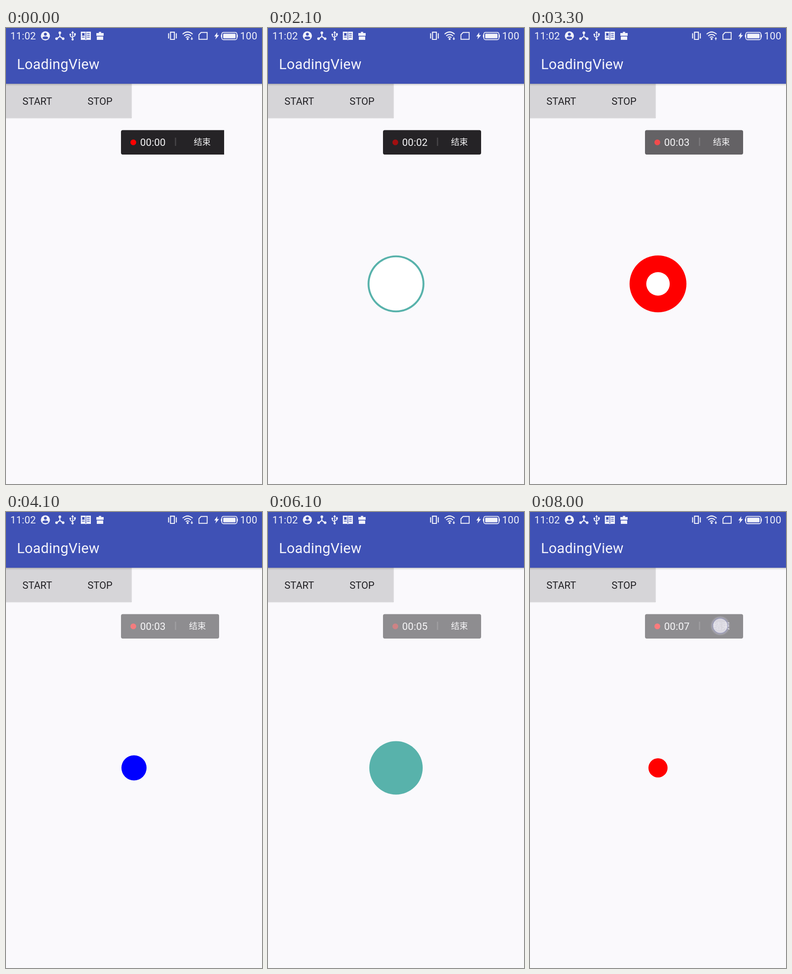
Animation, 561 px wide and 998 px high, one loop 8100 ms. Source, as an HTML page:

```html
<!DOCTYPE html>
<html lang="en">
<head>
<meta charset="utf-8">
<title>LoadingView</title>
<style>
html, body { margin: 0; width: 100%; height: 100%; overflow: hidden; background: #faf9fc; }
svg { display: block; width: 100%; height: 100%; font-family: Roboto, "Noto Sans", sans-serif; }
.cjk { font-family: "Noto Sans CJK SC", "Noto Sans CJK", sans-serif; }
</style>
</head>
<body>
<svg viewBox="0 0 561 998">
  <defs>
    <linearGradient id="shade" x2="0" y2="1">
      <stop offset="0" stop-color="#000" stop-opacity=".34"/>
      <stop offset=".4" stop-color="#000" stop-opacity=".12"/>
      <stop offset="1" stop-color="#000" stop-opacity="0"/>
    </linearGradient>
    <radialGradient id="glow">
      <stop offset=".7" stop-color="#d9d8ee" stop-opacity=".55"/>
      <stop offset="1" stop-color="#d9d8ee" stop-opacity="0"/>
    </radialGradient>
  </defs>
  <rect width="561" height="998" fill="#faf9fc"/>

  <!-- buttons -->
  <rect y="196" width="275" height="3" fill="url(#shade)" opacity=".7"/>
  <rect x="274" y="122" width="2" height="75" fill="#000" opacity=".1"/>
  <rect y="122" width="274.5" height="75" fill="#d6d5d8"/>
  <rect id="pressA" y="122" width="137.5" height="75"/>
  <rect id="pressB" x="137.5" y="122" width="137" height="75"/>
  <g font-size="21.8" fill="#212024" text-anchor="middle">
    <text x="68.5" y="167.7">START</text>
    <text x="206" y="167.7">STOP</text>
  </g>

  <!-- toolbar -->
  <rect y="121" width="561" height="6" fill="url(#shade)"/>
  <rect width="561" height="122" fill="#3f51b5"/>
  <text x="24" y="90" font-size="31" letter-spacing=".3" fill="#f4f4fb">LoadingView</text>

  <!-- status bar -->
  <g fill="#f1f2fa">
    <g font-size="22">
      <text x="9.5" y="25.4" letter-spacing=".3">11:02</text>
      <text x="513" y="25.4" letter-spacing=".2">100</text>
    </g>
    <circle cx="86.3" cy="17.2" r="10"/>
    <g fill="#3f51b5">
      <circle cx="86.3" cy="13.6" r="3.2"/>
      <path d="M80 22.5q0-4 6.3-4t6.3 4q-2.500 2-6.300 2t-6.300-2z"/>
    </g>
    <g stroke="#f1f2fa" stroke-width="2.2" fill="none">
      <path d="M118 11v7.500L111 23.500M118 18.500L125 23.500"/>
      <path d="M146 10v15M141 14.500v3.500l5 3.500M151 13.500v3.500l-5 3" stroke-width="1.8"/>
    </g>
    <circle cx="118" cy="10.5" r="2.9"/>
    <circle cx="110.8" cy="23.300" r="2.900"/>
    <circle cx="125.200" cy="23.300" r="2.900"/>
    <path d="M146 6.500l3.200 4.500h-6.400z"/>
    <circle cx="146" cy="25" r="2.400"/>
    <circle cx="141" cy="14.300" r="2"/>
    <path d="M149 11.500h4v4h-4z"/>
    <path d="M164 8h10l1 1 1-1h10v18h-10l-1 1-1-1h-10z"/>
    <path d="M166.500 12h6M166.500 16h6M166.500 20h6M177.500 12h6M177.500 16h6M177.500 20h6M175 10v15" stroke="#3f51b5" stroke-width="1.400"/>
    <path d="M167 11.500h5v5h-5z" fill="#3f51b5"/>
    <path d="M198 11h5.500v-2.500h5v2.500h5.500v6h-16zM199 18.500h14v7.500h-14z"/>
    <g fill="none" stroke="#f1f2fa" stroke-width="2.200">
      <path d="M360.500 9.200h8.500v15.800h-8.500zM356.300 11.500v11.500M373.200 11.500v11.500"/>
      <path d="M387 13.500q11-9.500 22 0M390.500 17.300q7.500-6.300 15 0M394 21q4-3.400 8 0"/>
      <path d="M427.500 9.700h13.300v15h-18v-10z" stroke-width="2"/>
      <rect x="473" y="9.700" width="33" height="15.800" rx="3.500" stroke-width="1.800"/>
    </g>
    <circle cx="398" cy="24" r="2.200"/>
    <path id="arrow" d="M406.300 20h1.800v3h2l-2.900 3.500-2.900-3.500h2z"/>
    <path d="M463 9.500l-6.500 9h4l-1.700 6.500 8-9.500h-4.300z"/>
    <rect x="476" y="12.500" width="27" height="10" rx="1"/>
    <path d="M471 14.500h2v6h-2zM506.500 14.500h1.500v6h-1.500z"/>
  </g>

  <!-- loader -->
  <circle id="disc" cx="280.5" cy="560" r="0"/>
  <circle id="hole" cx="280.5" cy="560" r="0" fill="#fff"/>

  <!-- recorder bar -->
  <g id="bar">
    <path id="panel" fill="#252326"/>
    <circle id="dot" cx="279" cy="250.300" r="6.300" fill="#f00"/>
    <text id="clock" x="294" y="257.600" font-size="22" letter-spacing=".2" fill="#f6f6f7">00:00</text>
    <rect x="370" y="240" width="3" height="18" fill="#434144"/>
    <text id="end" class="cjk" y="255.800" font-size="18.600" fill="#f6f6f7">结束</text>
  </g>

  <g id="touch">
    <circle r="22" fill="url(#glow)"/>
    <circle r="16.500" fill="#e6e5ea" fill-opacity=".72" stroke="#8183ae" stroke-opacity=".7" stroke-width="1.500"/>
  </g>
</svg>
<script>
const LOOP = 8100, STEP = 100, RADIUS = 62.3;
const COLORS = ["#58b2ab", "#f00", "#00f"];
// [ms, phase]: even phases fill the disc, odd ones open the hole
const PACE = [[541, 0], [900, .449], [1000, .61], [2100, 1.933], [3300, 3.413],
              [5000, 5.6], [6100, 6.939], [7300, 8.337]];
// [from, to, x, y]
const TAPS = [[300, 700, 64, 160], [6900, 7300, 200, 160], [7900, LOOP, 417, 249]];

const $ = id => document.getElementById(id);
const set = (id, attrs) => {
  for (const k in attrs) $(id).setAttribute(k, attrs[k]);
};
const clamp = v => Math.min(1, Math.max(0, v));

function phaseAt(t) {
  if (t <= PACE[0][0]) return 0;
  for (let i = 1; i < PACE.length; i++) {
    const [t0, p0] = PACE[i - 1], [t1, p1] = PACE[i];
    if (t <= t1) return p0 + (p1 - p0) * (t - t0) / (t1 - t0);
  }
  return PACE[PACE.length - 1][1];
}

function drawLoader(t) {
  const phase = phaseAt(t), half = Math.floor(phase);
  const r = RADIUS * (phase - half), opening = half % 2 === 1;
  set("disc", { r: opening ? RADIUS : r, fill: COLORS[(half >> 1) % 3] });
  set("hole", { r: opening ? r : 0 });
}

function drawBar(t) {
  const wide = t < STEP;
  set("panel", { d: wide
    ? "M256 223.500H478V277H256q-4 0-4-4V227.500q0-4 4-4z"
    : "M256 223.500H463q4 0 4 4V273q0 4-4 4H256q-4 0-4-4V227.500q0-4 4-4z" });
  set("end", { x: wide ? 411.500 : 401 });
  set("bar", { opacity: 1 - .5 * clamp((t - 3000) / 500) });
  set("dot", { "fill-opacity": .75 + .25 * Math.cos(2 * Math.PI * t / 800) });
  const seconds = Math.max(0, Math.floor((t - 70) / 1010));
  $("clock").textContent = "00:0" + seconds;
}

function press(id, t, [from, to]) {
  const amount = t < from ? 0 : clamp(1 - (t - to) / 300);
  set(id, { opacity: .12 * amount });
}

function drawTouch(t) {
  const tap = TAPS.find(([from, to]) => t >= from && t < to);
  set("touch", { visibility: tap ? "visible" : "hidden" });
  if (tap) set("touch", { transform: `translate(${tap[2]} ${tap[3]})` });
  press("pressA", t, TAPS[0]);
  press("pressB", t, TAPS[1]);
}

function draw(t) {
  drawLoader(t);
  drawBar(t);
  drawTouch(t);
  set("arrow", { transform: t % 900 === 600 ? "matrix(1 0 0 -1 0 46.500)" : "" });
}

function tick() {
  const t = performance.now() % LOOP;
  draw(Math.floor(t / STEP) * STEP);
  requestAnimationFrame(tick);
}
tick();
</script>
</body>
</html>
```
